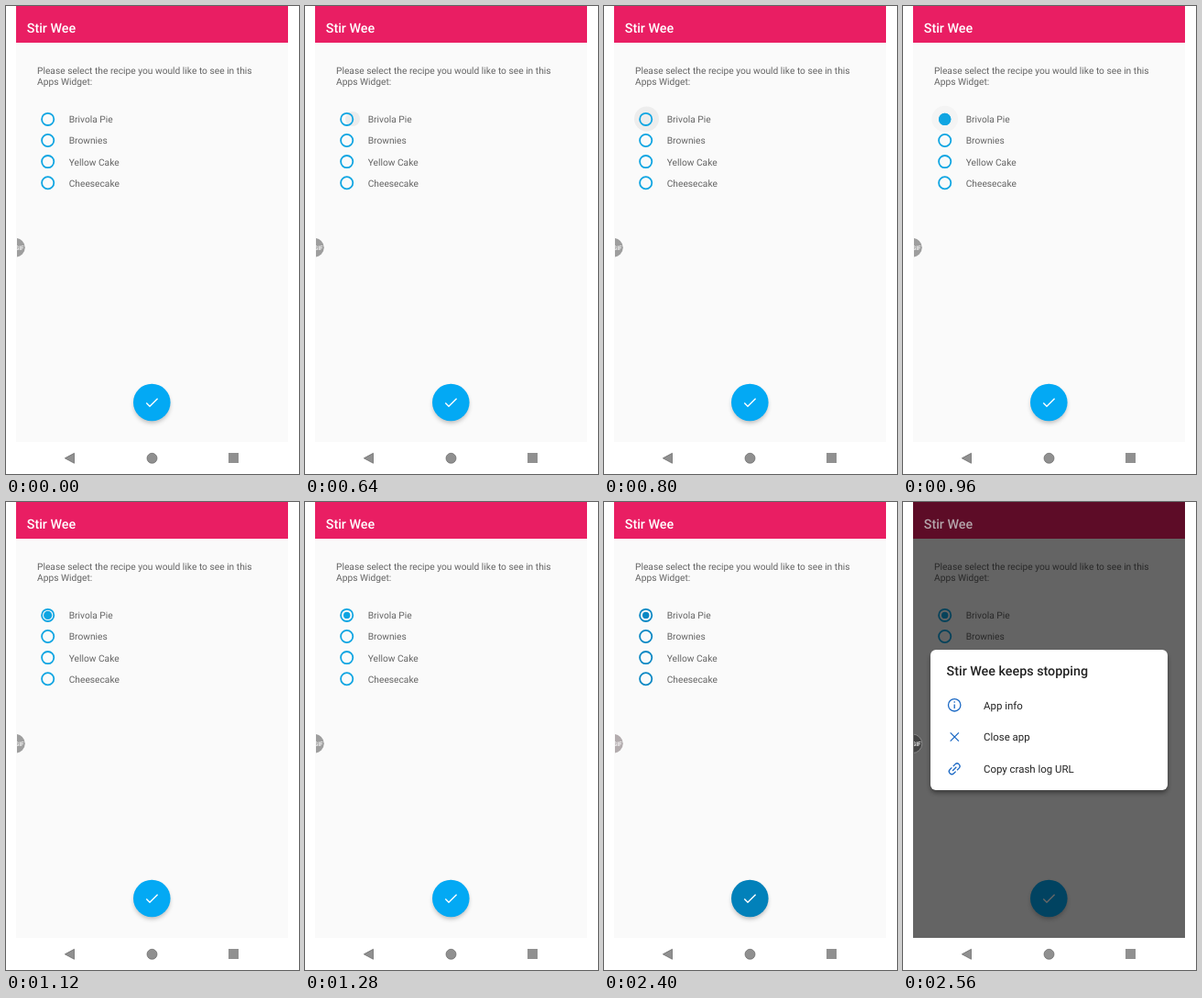
These frames come from a looping animation (320 px wide and 510 px high, 5.44 s). An HTML page:

```html
<!DOCTYPE html>
<html lang="en">
<head>
<meta charset="utf-8">
<title>Recipe widget setup</title>
<style>
  html, body { margin: 0; height: 100%; overflow: hidden; background: #fff; }
  svg { display: block; width: 320px; height: 510px; font: 10.22px Roboto, sans-serif; text-rendering: geometricPrecision; --accent: #03a9f4; --ring: #0fa5e2; }
  .title { font-weight: 500; font-size: 14.3px; }
  .item { font-size: 11.45px; fill: #222; }
  .line { fill: none; stroke: #1a68c4; stroke-width: 1.3; }
  .ring { fill: none; stroke: var(--ring); stroke-width: 1.8; }
  .shadow { filter: blur(2.5px); }
</style>
</head>
<body>
<svg viewBox="0 0 320 510">
  <defs>
    <clipPath id="screen"><rect x="11" width="297" height="475"/></clipPath>
    <clipPath id="edge"><rect x="12" y="250" width="20" height="30"/></clipPath>
  </defs>
  <g clip-path="url(#screen)">
    <rect x="11" width="297" height="475" fill="#fafafa"/>
    <rect x="11" width="297" height="40" fill="#e91e63"/>
    <g fill="#646464">
      <text x="34" y="74">Please select the recipe you would like to see in this</text>
      <text x="34" y="86">Apps Widget:</text>
    </g>
    <circle id="ripple"/>
    <g id="options" fill="#646464"></g>
    <circle id="dot" cx="45.7" cy="123.4" fill="var(--ring)"/>
    <circle class="shadow" cx="159.3" cy="435" r="19.5" opacity=".25"/>
    <circle cx="159.3" cy="432" r="20.3" fill="var(--accent)"/>
    <path d="M153.3 432.6l3.7 3.6 8.6-8.4" fill="none" stroke="#fff" stroke-width="1.4"/>
    <rect id="scrim" x="11" width="297" height="475" opacity=".6"/>
    <text id="heading" class="title" x="22.8" y="28.5">Stir Wee</text>
    <g id="bubble" clip-path="url(#edge)">
      <circle cx="10.5" cy="263.3" r="10.3"/>
      <text x="9.8" y="265.8" font-size="6.5" font-weight="500" fill="#fff" stroke="none">GIF</text>
    </g>
    <g id="dialog">
      <rect class="shadow" x="30" y="165" width="259" height="152" rx="6" opacity=".4"/>
      <rect x="30" y="161" width="259" height="153" rx="6" fill="#fff"/>
      <text class="title" x="47.6" y="189" fill="#222">Stir Wee keeps stopping</text>
      <g class="item">
        <text x="88" y="225.7">App info</text>
        <text x="88" y="260.4">Close app</text>
        <text x="88" y="295">Copy crash log URL</text>
      </g>
      <g class="line">
        <circle cx="56.2" cy="221.3" r="6.7"/>
        <path d="M56.2 217.3v1.5m0 1.6v4.6M51.7 251.4l9.2 9.2m0-9.2l-9.2 9.2"/>
        <g transform="translate(56.2 290.8) rotate(-45)">
          <path d="M-1 -3h-3a3 3 0 0 0 0 6h3M1 -3h3a3 3 0 0 1 0 6h-3M-3 0h6"/>
        </g>
      </g>
    </g>
  </g>
  <g fill="#909090" stroke="#555" stroke-width=".6">
    <path d="M64.3 492.8l10.2-5.5v11z"/>
    <circle cx="159.5" cy="492.8" r="5.5"/>
    <path d="M243 487h11v11h-11z" stroke="none"/>
  </g>
</svg>
<script>
const LOOP = 5440;
const $ = id => document.getElementById(id);
const svg = document.querySelector('svg');

$('options').innerHTML = ['Brivola Pie', 'Brownies', 'Yellow Cake', 'Cheesecake'].map((name, i) => {
  const y = 123.4 + i * 23.1;
  return `<circle class="ring" cx="45.7" cy="${y}" r="6.6"/><text x="68.7" y="${y + 3.9}">${name}</text>`;
}).join('');
const firstRing = document.querySelector('.ring');

const set = (el, attrs) => Object.entries(attrs).forEach(([key, value]) => el.setAttribute(key, value));
const show = (id, on) => { $(id).style.display = on ? '' : 'none'; };

const ripples = [
  [640, 52, 8, '#ececec'],
  [800, 46.5, 13.5, '#ededed'],
  [960, 45.7, 14.3, '#f4f4f4'],
  [1120, 45.7, 0, 'none']
];
const dots = [[960, 6.6], [1120, 4.6], [1280, 3.7]];
const at = (steps, t) => steps.filter(step => step[0] <= t).pop();

function draw(t) {
  const [, cx, r, fill] = at(ripples, t) || [0, 0, 0, 'none'];
  set($('ripple'), { cx, cy: 123, r, fill });

  const [, dot] = at(dots, t) || [0, 0];
  set($('dot'), { r: dot });
  set(firstRing, { r: t >= 960 && t < 1120 ? 5.8 : 6.6 });

  const pressed = t >= 2400 && t < 2560;
  const crashed = t >= 2560;
  svg.style.setProperty('--accent', pressed ? '#0281ba' : '#03a9f4');
  svg.style.setProperty('--ring', pressed ? '#0a88c4' : '#0fa5e2');
  show('scrim', crashed);
  show('dialog', crashed);
  set($('heading'), { fill: crashed ? '#b3a3a9' : '#fff' });
  set($('bubble'), { fill: crashed ? '#444' : pressed ? '#b3acae' : '#9e9e9e', stroke: crashed ? '#888' : 'none' });
}

function tick() {
  draw(performance.now() % LOOP);
  requestAnimationFrame(tick);
}
tick();
</script>
</body>
</html>
```
